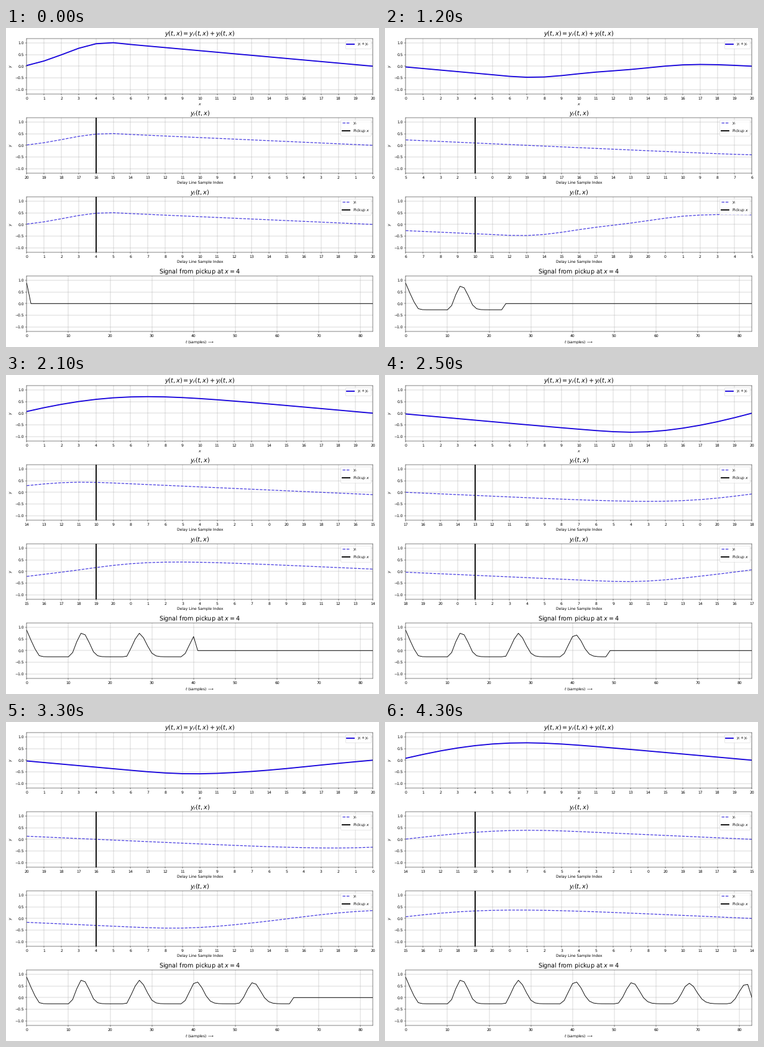
A matplotlib script for the animation above (4400 ms loop, 600 px wide and 512 px high).

```python
import numpy as np
import matplotlib.pyplot as plt
from matplotlib.animation import FuncAnimation

W, H, DPI = 600, 512, 40
FRAMES, INTERVAL = 44, 100
N = 20            # string length in samples
PICKUP = 4
STEPS = 3         # waveguide steps per recorded sample
SAMPLES = 84
BLUE, SOFT_BLUE = "#1400dc", "#4338e0"

# Type and line sizes: 10 pt text comes out 6 px tall
SCALE = 1.08
rc = plt.rcParams
rc["text.hinting"] = "none"
for key in ("font.size", "axes.linewidth", "grid.linewidth", "axes.labelpad",
            "axes.titlepad", "xtick.major.size", "ytick.major.size",
            "xtick.major.pad", "ytick.major.pad", "xtick.major.width",
            "ytick.major.width"):
    rc[key] *= SCALE


def simulate():
    """Plucked string: two travelling waves, a one-pole low-pass at the left
    end and a rigid reflection at the right end."""
    x = np.arange(N + 1)
    shape = (N - x) / 15
    shape[:6] = 0.03, 0.225, 0.49, 0.77, 0.965, 1.01
    right, left = shape / 2, shape / 2
    low = 0.0
    states, signal = [], np.zeros(SAMPLES)
    for n in range(SAMPLES):
        states.append((right.copy(), left.copy()))
        signal[n] = right[PICKUP - 1] + left[PICKUP]
        for _ in range(STEPS):
            right, left = np.roll(right, 1), np.roll(left, -1)
            low = 0.5 * left[0] + 0.5 * low
            right[0] = -low
            left[-1] = -right[-1]
    return states, signal


states, signal = simulate()
x = np.arange(N + 1)
t = np.arange(SAMPLES)

fig = plt.figure(figsize=(W / DPI, H / DPI), dpi=DPI, facecolor="white")


def panel(top, title, xlabel, xmax, step):
    left, width, height = 33.4, 556.8, 89.6
    ax = fig.add_axes([left / W, 1 - (top + height) / H, width / W, height / H])
    ax.set_xlim(0, xmax)
    ax.set_ylim(-1.2, 1.2)
    ax.set_xticks(range(0, xmax + 1, step))
    ax.set_yticks(np.arange(-1, 1.1, 0.5))
    ax.grid(True)
    ax.set_title(title, fontsize=16 * SCALE)
    ax.set_xlabel(xlabel)
    return ax


def wave_panel(top, name):
    ax = panel(top, f"${name}(t,x)$", "Delay Line Sample Index", N, 1)
    ax.set_ylabel("$y$")
    line, = ax.plot(x, 0 * x, "--", color=SOFT_BLUE, lw=2 * SCALE,
                    label=f"${name}$")
    ax.axvline(PICKUP, color="black", lw=3 * SCALE, label="Pickup $x$")
    ax.legend(loc="upper right")
    return ax, line


ax_sum = panel(16.5, "$y(t,x)=y_r(t,x)+y_l(t,x)$", "$x$", N, 1)
ax_sum.set_ylabel("$y$")
sum_line, = ax_sum.plot(x, 0 * x, color=BLUE, lw=3 * SCALE, label="$y_l+y_r$")
ax_sum.legend(loc="upper right")

ax_right, right_line = wave_panel(143.5, "y_r")
ax_left, left_line = wave_panel(270.5, "y_l")

ax_sig = panel(397.5, f"Signal from pickup at $x={PICKUP}$",
               r"$t$ (samples) $\longrightarrow$", SAMPLES - 1, 10)
sig_line, = ax_sig.plot(t, 0 * t, color="black", lw=1.5 * SCALE)


def update(k):
    n = int(k * SAMPLES / FRAMES + 0.37)
    right, left = states[n]
    sum_line.set_ydata(right + left)
    right_line.set_ydata(right)
    left_line.set_ydata(left)
    sig_line.set_ydata(np.where(t <= n, signal, 0))
    shift = STEPS * n
    ax_right.set_xticklabels((N + shift - x) % (N + 1))
    ax_left.set_xticklabels((shift + x) % (N + 1))
    return sum_line, right_line, left_line, sig_line


anim = FuncAnimation(fig, update, frames=FRAMES, interval=INTERVAL,
                     repeat=True, repeat_delay=0, blit=False)
plt.show()
```
